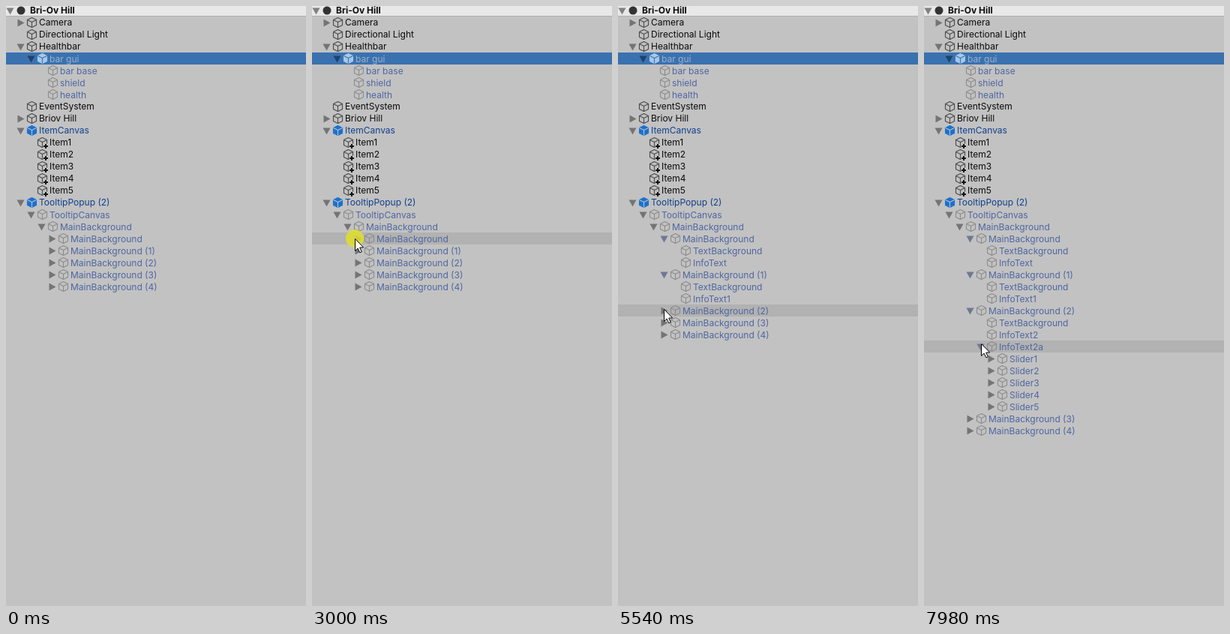
Write an HTML page with a canvas that moves like this. It is 400 by 800 pixels and loops after 8000 ms.

```html
<!DOCTYPE html>
<html lang="en">
<head>
<meta charset="utf-8">
<style>
  html, body { margin: 0; width: 100%; height: 100%; overflow: hidden; background: #c2c2c2; }
  canvas { display: block; }
</style>
</head>
<body>
<canvas id="stage" width="400" height="800"></canvas>
<script>
const ctx = document.getElementById('stage').getContext('2d');
const LOOP = 8000, STEP = 77.5, START = 200, ROW = 16, TOP = 14, BG = '#c2c2c2';

// Moments at which the folded branches open; each click starts CLICK ms earlier.
const OPEN = [3150, 4080, 5710, 7340], CLICK = 155;

const STYLES = {
  plain:    { text: '#0a0a0a', line: '#484848' },
  added:    { text: '#0a0a0a', line: '#484848', plus: true },
  prefab:   { text: '#10408c', fill: '#1b71cf' },
  inactive: { text: '#4f66a0', line: '#8c8c8c', drop: 1 },
  selected: { text: '#9db0cb', fill: '#a6c8ea', drop: 1, back: '#3a72b0', arrow: '#1d426d' }
};

const row = (depth, label, style = 'plain', arrow = '', from = 0) => ({ depth, label, style, arrow, from });
const inactive = (depth, label, arrow, from) => row(depth, label, 'inactive', arrow, from);

// An arrow is '>' (closed), 'v' (open) or the time at which it opens.
const tree = [
  row(0, 'Camera', 'plain', '>'),
  row(0, 'Directional Light'),
  row(0, 'Healthbar', 'plain', 'v'),
  row(1, 'bar gui', 'selected', 'v'),
  ...['bar base', 'shield', 'health'].map(name => inactive(2, name)),
  row(0, 'EventSystem'),
  row(0, 'Briov Hill', 'plain', '>'),
  row(0, 'ItemCanvas', 'prefab', 'v'),
  ...[1, 2, 3, 4, 5].map(n => row(1, 'Item' + n, 'added')),
  row(0, 'TooltipPopup (2)', 'prefab', 'v'),
  inactive(1, 'TooltipCanvas', 'v'),
  inactive(2, 'MainBackground', 'v'),
  ...['', 1, 2].flatMap((n, i) => [
    inactive(3, 'MainBackground' + (n && ` (${n})`), OPEN[i]),
    inactive(4, 'TextBackground', '', OPEN[i]),
    inactive(4, 'InfoText' + n, '', OPEN[i])
  ]),
  inactive(4, 'InfoText2a', OPEN[3], OPEN[2]),
  ...[1, 2, 3, 4, 5].map(n => inactive(5, 'Slider' + n, '>', OPEN[3])),
  inactive(3, 'MainBackground (3)', '>'),
  inactive(3, 'MainBackground (4)', '>')
];

// Pointer path: [step, x, y]
const path = [
  [0, 314, 786], [1, 254, 688], [2, 196, 601], [3, 159, 546], [5, 159, 546],
  [7, 88, 457], [9, 29, 384], [12, 29, 384], [16, 50, 276], [20, 62, 436],
  [22, 68, 358], [23, 70, 327], [27, 41, 324], [30, 58, 318], [31, 58, 318],
  [33, 57, 310], [38, 57, 310], [44, 63, 355], [45, 63, 359], [52, 63, 359],
  [55, 29, 380], [58, 62, 404], [66, 62, 404], [67, 61, 404], [74, 61, 404],
  [75, 59, 392], [76, 59, 392], [79, 63, 449], [80, 64, 451], [83, 72, 457],
  [85, 72, 457], [87, 72, 454], [89, 72, 454], [90, 70, 454], [96, 70, 454],
  [98, 74, 440], [99, 75, 448], [100, 76, 450]
];

function pointerAt(step) {
  if (step < 0) return null;
  const next = path.findIndex(p => p[0] >= step);
  if (next < 0) return path[path.length - 1].slice(1);
  if (next === 0) return path[0].slice(1);
  const [k0, x0, y0] = path[next - 1], [k1, x1, y1] = path[next];
  const u = (step - k0) / (k1 - k0);
  return [Math.round(x0 + (x1 - x0) * u), Math.round(y0 + (y1 - y0) * u)];
}

function trace(points, close = true) {
  ctx.beginPath();
  points.forEach(([x, y]) => ctx.lineTo(x, y));
  if (close) ctx.closePath();
}

function disc(x, y, r, color) {
  ctx.fillStyle = color;
  ctx.beginPath();
  ctx.arc(x, y, r, 0, 2 * Math.PI);
  ctx.fill();
}

function text(label, x, y, color, weight = 400) {
  ctx.font = `${weight} 12px Inter, sans-serif`;
  ctx.fillStyle = color;
  ctx.fillText(label, x, y);
}

function arrow(x, y, open, color) {
  ctx.fillStyle = color;
  trace(open ? [[x - 5, y - 4], [x + 5, y - 4], [x, y + 5]]
             : [[x - 4, y - 5], [x + 5, y], [x - 4, y + 5]]);
  ctx.fill();
}

function cube(x, y, { line, fill, plus }, back) {
  ctx.save();
  ctx.translate(x, y);
  ctx.lineWidth = 1.1;
  ctx.lineJoin = 'round';
  trace([[0, -6.5], [6, -3.5], [6, 3.5], [0, 6.5], [-6, 3.5], [-6, -3.5]]);
  ctx.strokeStyle = ctx.fillStyle = fill || line;
  if (fill) ctx.fill();
  ctx.stroke();
  if (fill) ctx.strokeStyle = back;
  trace([[-6, -3.5], [0, -0.5], [6, -3.5]], false);
  ctx.moveTo(0, -0.5);
  ctx.lineTo(0, 6.5);
  ctx.stroke();
  if (plus) {
    ctx.fillStyle = back;
    ctx.fillRect(1, 1.5, 7, 7);
    ctx.fillStyle = '#111';
    ctx.fillRect(1.5, 4, 6, 2);
    ctx.fillRect(3.5, 2, 2, 6);
  }
  ctx.restore();
}

function pointer(x, y) {
  ctx.save();
  ctx.translate(x + 0.5, y + 0.5);
  trace([[0, 0], [0, 16], [3.6, 12.6], [6.3, 18.3], [8.8, 17.2], [6.2, 11.6], [11.2, 11.4]]);
  ctx.fillStyle = '#fff';
  ctx.strokeStyle = '#000';
  ctx.lineWidth = 1;
  ctx.fill();
  ctx.stroke();
  ctx.restore();
}

function drawRow({ depth, label, style, arrow: state }, y, t, hovered) {
  const look = STYLES[style], x = 14 * depth;
  const back = look.back || (hovered ? '#b2b2b2' : BG);
  if (back !== BG) {
    ctx.fillStyle = back;
    ctx.fillRect(0, y, 400, ROW);
  }
  const timed = typeof state === 'number', open = state === 'v' || (timed && t >= state);
  if (state) arrow(x + 19.5, y + 8.5, open, look.arrow || (timed && open ? '#6e7893' : '#747474'));
  cube(x + 34.5, y + 8, look, back);
  text(label, x + 44, y + 12 + (look.drop || 0), look.text);
}

function draw(t) {
  const step = Math.floor((t - START) / STEP);
  const tip = pointerAt(step), lagging = pointerAt(step - 1);
  const hover = lagging ? Math.floor((lagging[1] - TOP) / ROW) : -1;

  ctx.fillStyle = BG;
  ctx.fillRect(0, 0, 400, 800);
  ctx.fillStyle = '#e8e8e8';
  ctx.fillRect(0, 0, 400, 13);
  ctx.fillStyle = '#b0b0b0';
  ctx.fillRect(0, 13, 400, 1);
  arrow(5.5, 6.5, true, '#808080');
  disc(20, 6, 5.5, '#333');
  text('Bri-Ov Hill', 32, 10, '#0a0a0a', 700);

  tree.filter(r => t >= r.from)
      .forEach((r, i) => drawRow(r, TOP + i * ROW, t, i === hover));

  if (!tip) return;
  if (OPEN.some(end => t >= end - CLICK && t < end)) disc(...tip, 12, 'rgba(226, 224, 38, 0.82)');
  pointer(...tip);
}

function tick() {
  draw(performance.now() % LOOP);
  requestAnimationFrame(tick);
}
tick();
</script>
</body>
</html>
```
